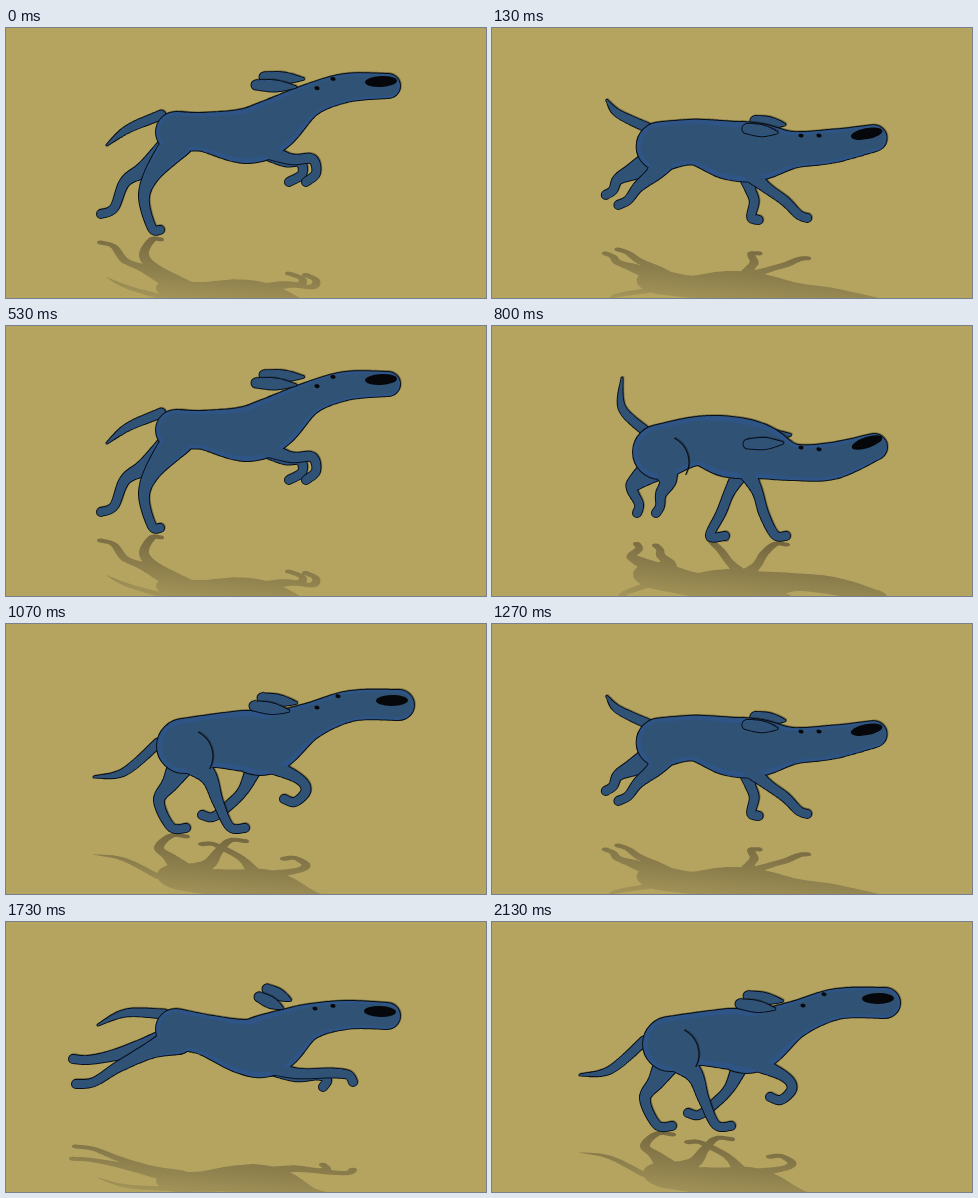
Animation of 480 by 270 pixels, one loop 2190 ms. Source, as an HTML page with a canvas:

```html
<!DOCTYPE html>
<html lang="en">
<head>
<meta charset="utf-8">
<title>Running dog</title>
<style>
html, body { margin: 0; width: 100%; height: 100%; overflow: hidden; background: #b4a460; }
canvas { display: block; width: 100vw; height: 100vh; }
</style>
</head>
<body>
<canvas id="stage" width="480" height="270"></canvas>
<script>
const ctx = document.getElementById('stage').getContext('2d');
const LOOP = 2190, SLOT = 200 / 3;
const GROUND = '#b4a460', FUR = '#2f5275', EDGE = '#2e5585', INK = '#0b1016';

// Thickness along each kind of limb, from its first joint to its last.
const HIND = [15, 8, 5, 4, 4], FORE = [9, 5, 4.5, 4, 4];
const TAIL = [.6, 3.5, 4.5], EAR = [1, 5.5, 4.5];

// Joints as x,y pairs. Spine: hip, waist, ribs, chest, neck, head, muzzle.
// Legs: knee, hock, ankle, toe. Tail: tip to root. Ear: root to tip.
const pushOff = {
  spine: [170,104, 197,104, 240,108, 266,98, 302,73, 340,60, 382,58],
  girth: [20, 19, 27, 26, 16, 14, 12],
  tail: [101,117, 122,101, 155,87], ear: [289,59, 250,57],
  hind: [147,145, 138,170, 146,200, 154,202], farHind: [140,140, 119,154, 108,180, 95,186],
  fore: [284,131, 306,131, 310,145, 300,154], farFore: [278,133, 294,134, 296,146, 283,154]
};
const flight = {
  spine: [170,107, 200,113, 240,125, 264,122, 300,101, 340,93, 381,94],
  girth: [20, 20, 27, 30, 18, 14, 13],
  tail: [92,103, 120,91, 158,92], ear: [276,86, 253,75],
  hind: [145,128, 112,145, 88,160, 70,162], farHind: [135,126, 105,134, 82,138, 67,137],
  fore: [288,151, 325,151, 342,153, 347,160], farFore: [288,154, 312,153, 321,158, 317,165]
};
const plant = {
  spine: [168,126, 205,115, 238,121, 266,125, 300,136, 340,135, 382,121],
  girth: [27, 24, 30, 27, 18, 18, 13],
  tail: [130,52, 130,82, 152,104], ear: [290,117, 256,118],
  hind: [176,154, 169,168, 168,180, 164,187], farHind: [145,155, 140,163, 147,178, 145,187],
  fore: [265,165, 272,188, 283,209, 294,210], farFore: [238,165, 229,187, 218,210, 233,210]
};
const gather = {
  spine: [173,129, 205,122, 240,127, 266,139, 300,159, 340,157, 376,149],
  girth: [28, 28, 30, 25, 19, 17, 13],
  tail: [87,101, 107,122, 152,118], ear: [288,138, 256,140],
  hind: [198,148, 197,163, 188,169, 179,169], farHind: [160,150, 158,154, 155,155, 151,155],
  fore: [222,166, 204,188, 193,203, 206,203], farFore: [215,168, 197,185, 185,187, 177,188]
};
const crouch = {
  spine: [176,133, 208,122, 238,122, 265,124, 297,126, 345,118, 387,105],
  girth: [30, 28, 28, 22, 22, 17, 10],
  tail: [89,134, 115,140, 154,118], ear: [278,107, 255,129],
  hind: [176,166, 205,167, 213,175, 210,182], farHind: [182,170, 187,190, 195,206, 209,206],
  fore: [228,160, 224,180, 213,193, 203,191], farFore: [235,165, 228,180, 216,186, 208,183]
};
const rise = {
  spine: [178,122, 205,117, 240,117, 262,119, 302,98, 345,82, 393,81],
  girth: [27, 26, 30, 30, 18, 15, 15],
  tail: [88,153, 118,148, 152,119], ear: [282,87, 248,82],
  hind: [202,152, 212,178, 224,203, 239,204], farHind: [165,158, 153,177, 165,203, 180,204],
  fore: [290,153, 300,166, 289,178, 278,175], farFore: [238,165, 222,182, 207,193, 196,191]
};

const lerp = (a, b, t) => a + (b - a) * t;

function mix(a, b, t) {
  const pose = {};
  for (const key in a) pose[key] = a[key].map((v, i) => lerp(v, b[key][i], t));
  return pose;
}

const poses = [pushOff, flight, mix(flight, plant, .6), plant, gather, crouch, rise];

function spline(a, b, c, d, t) {
  return b + t / 2 * (c - a + t * (2 * a - 5 * b + 4 * c - d + t * (3 * (b - c) + d - a)));
}

// Adds a smooth tube through the joints to a path, as a row of circles.
function sweep(path, { joints, radii }, scale) {
  const last = radii.length - 1, steps = 20;
  const clamp = i => Math.max(0, Math.min(last, i));
  for (let s = 0; s <= last * steps; s++) {
    const i = Math.min(last - 1, Math.floor(s / steps)), t = s / steps - i;
    const along = get => spline(...[i - 1, i, i + 1, i + 2].map(k => get(clamp(k))), t);
    const x = along(k => joints[2 * k]), y = along(k => joints[2 * k + 1]);
    const r = Math.max(.4, along(k => radii[k]) * scale);
    path.moveTo(x + r, y);
    path.arc(x, y, r, 0, 7);
  }
}

function outline(tubes, scale = 1) {
  const path = new Path2D();
  for (const tube of tubes) sweep(path, tube, scale);
  return path;
}

function pencil(path, width) {
  ctx.strokeStyle = INK;
  ctx.lineWidth = width;
  ctx.stroke(path);
  ctx.save();
  ctx.globalAlpha = .35;
  ctx.translate(.8, -.7);
  ctx.stroke(path);
  ctx.restore();
}

// Overlapping tubes share one outline.
function fur(...tubes) {
  const path = outline(tubes);
  pencil(path, 2);
  ctx.fillStyle = EDGE;
  ctx.fill(path);
  ctx.fillStyle = FUR;
  ctx.fill(outline(tubes, .82));
}

const shade = ctx.createLinearGradient(0, 212, 0, 75);
shade.addColorStop(0, '#74673f');
shade.addColorStop(1, '#a6975a');

function shadow(...tubes) {
  ctx.fillStyle = shade;
  ctx.fill(outline(tubes));
}

function build({ spine, girth, tail, ear, hind, farHind, fore, farFore }) {
  const hip = [spine[0] + 2, spine[1] + 10];
  const shoulder = [(spine[4] + spine[6]) / 2, (spine[5] + spine[7]) / 2 + .6 * girth[2]];
  const leg = (root, rest, radii) => ({ joints: [...root, ...rest], radii });
  const flap = ([x, y, u, v]) => ({ joints: [x, y, (x + u) / 2, (y + v) / 2, u, v], radii: EAR });
  return {
    spine, girth, hip,
    far: [leg(hip, farHind, HIND), leg(shoulder, farFore, FORE)],
    tail: { joints: tail, radii: TAIL },
    near: [{ joints: spine, radii: girth }, leg(hip, hind, HIND), leg(shoulder, fore, FORE)],
    ear: flap(ear),
    farEar: flap(ear.map((v, i) => v + (i % 2 ? -8 : 8)))
  };
}

function oval(x, y, rx, ry, tilt) {
  ctx.beginPath();
  ctx.ellipse(x, y, rx, ry, tilt, 0, 7);
  ctx.fill();
}

function face({ spine, girth }) {
  const [nx, ny, hx, hy, mx, my] = spine.slice(8);
  const tilt = Math.atan2(my - hy, mx - hx);
  ctx.fillStyle = '#05070b';
  oval(nx + 9, ny - .8 * girth[4], 2.6, 1.9, .2);
  oval(hx - 13, hy - .65 * girth[5], 2.6, 1.9, .2);
  oval(mx - 7, my - 4.5, 16, 5.5, tilt);
}

// The front of the thigh shows when the hips are bunched up.
function thigh({ hip, girth }) {
  if (girth[0] < 25) return;
  const path = new Path2D();
  path.arc(hip[0], hip[1], girth[0], -1.1, .5);
  pencil(path, 1.2);
}

function drawDog(dog) {
  for (const limb of dog.far) fur(limb);
  fur(dog.tail);
  fur(dog.farEar);
  fur(...dog.near);
  thigh(dog);
  fur(dog.ear);
  face(dog);
}

const dogs = poses.map(build);

function dogAt(t) {
  const slot = Math.floor((Math.floor(t / 10) * 10 + 3.5) / SLOT);
  // Every fifth drawing is held for two slots.
  return dogs[(slot - Math.floor((slot + 3) / 6)) % dogs.length];
}

function draw(dog) {
  ctx.setTransform(1, 0, 0, 1, 0, 0);
  ctx.fillStyle = GROUND;
  ctx.fillRect(0, 0, 480, 270);
  // Squashed, slightly slanted reflection.
  ctx.setTransform(1, .08, 0, -.5, 0, 300);
  shadow(...dog.far, dog.tail, dog.farEar, ...dog.near, dog.ear);
  ctx.setTransform(1, 0, 0, 1, 0, 0);
  drawDog(dog);
}

const start = performance.now();
let shown;
function tick() {
  const dog = dogAt((performance.now() - start) % LOOP);
  if (dog !== shown) draw(shown = dog);
  requestAnimationFrame(tick);
}
tick();
</script>
</body>
</html>
```
